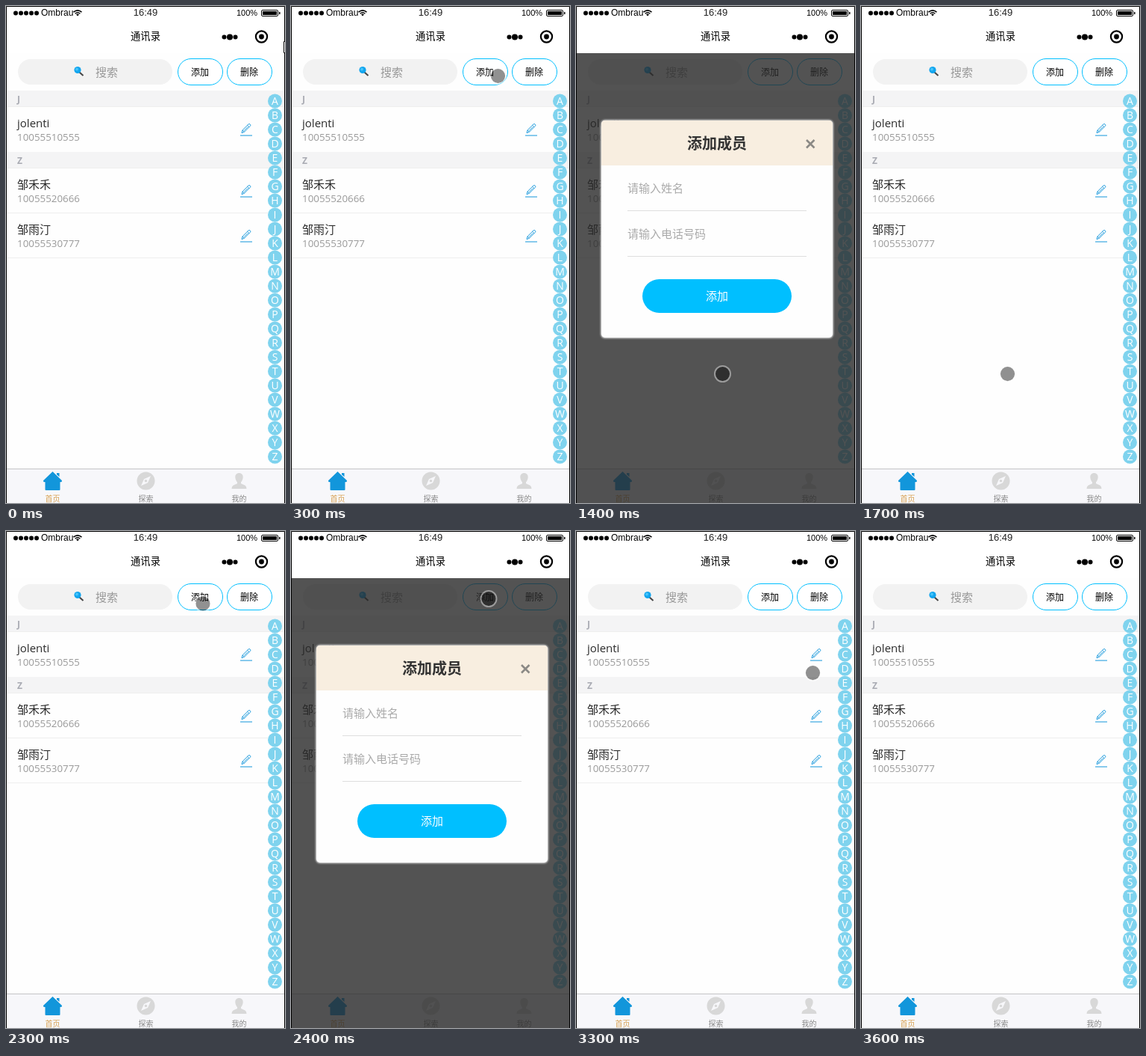
Write an HTML page that moves like this. It is 374 px wide and 664 px high and loops after 4.1 s.

```html
<!DOCTYPE html>
<html lang="zh-CN">
<head>
<meta charset="utf-8">
<title>通讯录</title>
<style>
  html, body { margin: 0; width: 100%; height: 100%; overflow: hidden; background: #fff; }
  svg { display: block; width: 374px; height: 664px; }
  text { font-family: "Open Sans", "Noto Sans CJK SC", "Noto Sans CJK", sans-serif; }
  .bar { font-family: "Liberation Sans", Arial, sans-serif; }
</style>
</head>
<body>
<svg id="stage" viewBox="0 0 374 664" xmlns="http://www.w3.org/2000/svg"></svg>
<script>
const BLUE = '#00bfff', ICON = '#1296db', GREY = '#d8d8d8';
const LOOP = 4100, STEP = 100;

// y is the vertical middle of the glyphs
const text = (s, x, y, size, fill, extra = '') =>
  `<text x="${x}" y="${y + size * 0.37}" font-size="${size}" fill="${fill}" ${extra}>${s}</text>`;
const mid = (s, x, y, size, fill, extra = '') =>
  text(s, x, y, size, fill, 'text-anchor="middle" ' + extra);
const rect = (x, y, w, h, fill, extra = '') =>
  `<rect x="${x}" y="${y}" width="${w}" height="${h}" fill="${fill}" ${extra}/>`;
const dot = (x, y, r, fill, extra = '') =>
  `<circle cx="${x}" cy="${y}" r="${r}" fill="${fill}" ${extra}/>`;
const path = (d, fill, extra = '') => `<path d="${d}" fill="${fill}" ${extra}/>`;
const line = (d, color, width = 1, extra = '') =>
  path(d, 'none', `stroke="${color}" stroke-width="${width}" ${extra}`);

function statusBar() {
  const signal = [0, 1, 2, 3, 4].map(i => dot(13 + 7 * i, 9.5, 3, '#000')).join('');
  return rect(0, 0, 374, 63, '#fff') + signal
    + text('Ombrau', 47, 9, 12, '#000', 'class="bar"')
    + line('M90.5 8.2Q96 3.6 101.5 8.2M92.6 10.2Q96 7.2 99.4 10.2', '#000', 1.5)
    + path('M94 11.2Q96 9.6 98 11.2L96 13.5Z', '#000')
    + mid('16:49', 187, 8.5, 13, '#222', 'class="bar"')
    + text('100%', 309, 9.2, 11, '#000', 'class="bar"')
    + rect(342.5, 5.5, 22, 8, '#fff', 'rx="1.5" stroke="#000"')
    + rect(344, 7, 19, 5, '#000') + rect(366, 8, 1.5, 3, '#000')
    + mid('通讯录', 187, 40.3, 13.3, '#000')
    + dot(292.5, 41.5, 3, '#000') + dot(300, 41.5, 4, '#000') + dot(307.5, 41.5, 3, '#000')
    + dot(342.5, 41, 7.6, 'none', 'stroke="#000" stroke-width="2.2"') + dot(342.5, 41, 3.4, '#000');
}

function pillButton(label, x) {
  return rect(x + .5, 70.5, 60, 35, '#fff', `rx="17.5" stroke="${BLUE}"`)
    + mid(label, x + 30, 88.3, 12, '#000');
}

function pencil(y) {
  return `<g transform="translate(314 ${y})">`
    + line('M0 9.5H16', ICON)
    + line('M2 6.2L3 2.4L11 -5.6Q12 -6.6 13.2 -5.4Q14.4 -4.2 13.4 -3.2L5.4 4.8ZM9.6 -4.2L12 -1.8M3 2.4L5.4 4.8M5 3.2L10.2 -2', ICON, .9)
    + '</g>';
}

const section = (letter, y) =>
  rect(1, y, 372, 22, '#f4f4f5') + text(letter, 15, y + 12, 12, '#a9abb3', 'font-weight="700"');

const contact = (name, phone, y) =>
  text(name, 15, y, 15, '#2b2b2b') + text(phone, 15, y + 18.5, 13.35, '#999') + pencil(y + 7);

function letterIndex() {
  return [...'ABCDEFGHIJKLMNOPQRSTUVWXYZ'].map((c, i) =>
    dot(360.5, 127 + 19 * i, 9.5, '#7fd3ee') + mid(c, 360.5, 127 + 19 * i, 14, '#fff')).join('');
}

function tabBar() {
  return rect(1, 618, 372, 46, '#f7f7fa') + line('M1 618.5H373', '#c4c4c6')
    + path('M62.5 622L75 634Q75.5 636 73.5 636H72.5V646Q72.5 647 71.5 647H53.5Q52.5 647 52.5 646V636H51.5Q49.5 636 50 634ZM68 624H71.5V629L68 626Z', ICON)
    + dot(187.5, 634.5, 12, GREY)
    + path('M194 628L190 637L181 641L185 632Z', '#f7f7fa') + dot(187.5, 634.5, 1.8, GREY)
    + path('M312.5 624C316 624 318 626.5 317.7 630C317.4 633 316 635 315 636.2V638L320.5 640.4Q322.5 641.5 322.5 645H302.5Q302.5 641.5 304.5 640.4L310 638V636.2C309 635 307.6 633 307.3 630C307 626.5 309 624 312.5 624Z', GREY)
    + mid('首页', 62.5, 657.8, 10, '#d8a050')
    + mid('探索', 187.5, 657.8, 10, '#888')
    + mid('我的', 312.5, 657.8, 10, '#888');
}

function page() {
  return rect(0, 63, 374, 601, '#fefefe')
    + rect(16, 71, 207, 34, '#f2f2f2', 'rx="17"')
    + line('M98.5 88.5L103.5 93', '#444', 2) + dot(96, 85.5, 4.6, '#12a5ee')
    + dot(95, 84.5, 2, '#46c4fa')
    + text('搜索', 120, 88.5, 15, '#999')
    + pillButton('添加', 230) + pillButton('删除', 296)
    + section('J', 113) + contact('jolenti', '10055510555', 156.5)
    + section('Z', 195) + contact('邹禾禾', '10055520666', 238.5)
    + contact('邹雨汀', '10055530777', 298.5)
    + line('M1 134.5H373M1 216.5H373M1 276.5H351M1 336.5H351', '#eeeeee')
    + letterIndex() + tabBar();
}

function dialog() {
  const field = (label, y) =>
    text(label, 69, y, 15, '#aaa') + line(`M69 ${y + 30}H309`, '#dedede');
  return '<g id="dialog">'
    + rect(1, 63, 372, 601, '#292929', 'fill-opacity=".8"')
    + rect(33, 152, 312, 292, '#ddd', 'rx="6" filter="url(#glow)"')
    + rect(34, 153, 310, 290, '#fefefe', 'rx="5"')
    + path('M34 213V158Q34 153 39 153H339Q344 153 344 158V213Z', '#f8eee0')
    + mid('添加成员', 189, 184, 20, '#333', 'font-weight="700"')
    + line('M309 179L319.5 189.5M319.5 179L309 189.5', '#8b8985', 2.6)
    + field('请输入姓名', 243.5) + field('请输入电话号码', 304.5)
    + rect(89, 365, 200, 45, BLUE, 'rx="22.5"')
    + mid('添加', 189, 387.5, 15, '#fff') + '</g>';
}

document.getElementById('stage').innerHTML =
  '<defs><filter id="glow" x="-5%" y="-5%" width="110%" height="110%"><feGaussianBlur stdDeviation="1.3"/></filter></defs>'
  + page() + dialog() + statusBar()
  + '<g id="touch">' + dot(0, 0, 9.7, '#000', 'fill-opacity=".43"')
  + dot(0, 0, 10.5, 'none', 'stroke="#fff" stroke-opacity=".42" stroke-width="2"') + '</g>'
  + line('M.5 664V.5H373.5V664', '#000')
  + path('M374 47.5H372.5V62.5H374', '#fff', 'id="pointer" stroke="#000"');

const [dialogEl, touchEl, pointerEl] =
  ['dialog', 'touch', 'pointer'].map(id => document.getElementById(id));

// touch positions: step, x, y
const track = [
  [1, 335, 78], [2, 293, 90], [3, 277.5, 93.5], [7, 277.5, 93.5],
  [8, 273, 116], [11, 229, 335], [12, 213.5, 396], [13, 202, 458], [14, 196.5, 491.5],
  [17, 196.5, 491.5], [18, 204, 465], [19, 215, 410], [21, 245.5, 218], [22, 258, 138],
  [23, 264, 97], [24, 265, 90.5], [25, 270, 98], [26, 289, 130], [27, 311, 170],
  [28, 322, 188.5], [30, 317.5, 189.5], [33, 317.5, 189.5], [34, 343, 134], [35, 363.5, 72]
];

function place(n) {
  const i = track.findIndex(k => k[0] >= n);
  const b = track[i], a = track[Math.max(0, i - 1)];
  const f = b[0] === a[0] ? 1 : (n - a[0]) / (b[0] - a[0]);
  return [a[1] + (b[1] - a[1]) * f, a[2] + (b[2] - a[2]) * f];
}

const show = (el, on) => el.setAttribute('visibility', on ? 'visible' : 'hidden');

function draw(ms) {
  const n = Math.floor((ms % LOOP) / STEP);
  const touching = n >= 1 && n <= 35;
  show(dialogEl, (n >= 7 && n < 17) || (n >= 24 && n < 33));
  show(pointerEl, n === 0);
  show(touchEl, touching);
  if (touching) touchEl.setAttribute('transform', `translate(${place(n)})`);
}

const start = performance.now();
function tick() {
  draw(performance.now() - start);
  requestAnimationFrame(tick);
}
tick();
</script>
</body>
</html>
```
